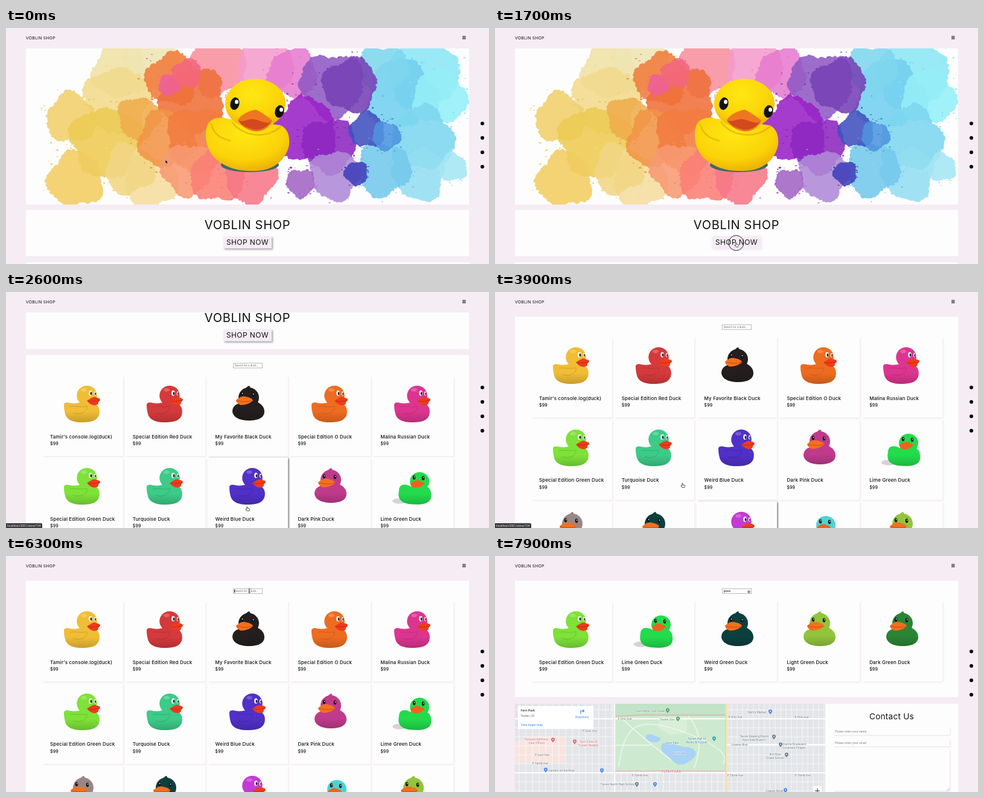
An HTML page that plays this animation: 800x393 px, repeating every 8000 ms.

```html
<!DOCTYPE html>
<html lang="en">
<head>
<meta charset="utf-8">
<title>Voblin Shop</title>
<style>
html, body { margin: 0; width: 100%; height: 100%; overflow: hidden; background: #f5ecf4; }
#stage { position: relative; width: 800px; height: 393px; overflow: hidden; color: #111; font-family: Inter, sans-serif; }
#stage div, svg { position: absolute; }
.t { line-height: 0; white-space: nowrap; }
.mid { left: 0; width: 800px; text-align: center; }
.panel { left: 33px; width: 734px; background: #fdfdfd; }
#page { left: 0; top: 0; width: 800px; }
#nav { left: 0; top: 0; width: 800px; height: 34px; background: #f5ecf4; }
#shop { left: 360px; top: 347px; width: 80px; height: 20px; background: #f5ebf4; box-shadow: 2px 2px 3px #aaa4aa; }
#shop.over { box-shadow: 1px 1px 4px 1px #f3e6f2; }
.card { width: 133.5px; height: 134px; background: #fdfdfd; box-shadow: 1.5px 1.5px 3px #f1e6ef; }
.card.over { box-shadow: 2px 1px 3px #8d878d; }
.card .t { left: 13px; font-size: 8px; font-weight: 500; letter-spacing: .15px; }
#box { left: 376px; top: 13px; width: 47px; height: 7px; border: .5px solid #bbb; background: #fff;
  font-family: "Liberation Sans", Arial, sans-serif; font-size: 4.6px; }
#status { left: 0; top: 385px; width: 60px; height: 8px; background: #3b3a3c; color: #ddd; border-radius: 0 2px 0 0;
  font: 4.9px Roboto, sans-serif; }
.field { left: 561px; width: 192px; background: #fdfdfd; box-shadow: 1px 1px 2px #eadfe8; color: #777; font-size: 4.7px; }
</style>
</head>
<body>
<div id="stage">
  <div id="page">
    <svg id="hero" style="left:33px;top:34px" width="734" height="260" viewBox="33 34 734 260"></svg>
    <div class="panel" style="top:303px;height:77px"></div>
    <div class="t mid" style="top:328px;font-size:20px;letter-spacing:.7px">VOBLIN SHOP</div>
    <div id="shop"></div>
    <div class="t mid" style="top:357px;font-size:12px;letter-spacing:.4px">SHOP NOW</div>
    <div id="store" style="top:390px;left:0">
      <div class="panel" id="shelf" style="top:0"></div>
      <div id="box"><div class="t" id="query" style="left:1.5px;top:3.7px"></div>
        <div id="caret" style="left:1.2px;top:1px;width:.6px;height:5px;background:#000"></div>
        <svg id="clear" style="left:41px;top:1.5px" width="5" height="5" viewBox="0 0 5 5"><circle cx="2.5" cy="2.5" r="2.2" fill="#777"/><path d="M1.6 1.6l1.8 1.8m0-1.8l-1.8 1.8" stroke="#fff" stroke-width=".6"/></svg>
      </div>
      <div id="cards"></div>
      <div id="visit" style="left:0">
        <div class="panel" style="top:0;height:200px"></div>
        <svg id="map" style="left:33px;top:0" width="514" height="200" viewBox="33 246 514 200"></svg>
        <div class="t" style="left:547px;width:220px;top:21px;text-align:center;font-size:13.6px;letter-spacing:.25px">Contact Us</div>
        <div class="field" style="top:40px;height:12px"><div class="t" style="left:2px;top:6px">Please enter your name</div></div>
        <div class="field" style="top:59px;height:12px"><div class="t" style="left:2px;top:6px">Please enter your email</div></div>
        <div class="field" style="top:77px;height:68px"><svg style="right:0;bottom:0" width="5" height="5"><path d="M0 5L5 0M3 5L5 3" stroke="#888" stroke-width=".6"/></svg></div>
      </div>
    </div>
  </div>
  <div id="nav">
    <div class="t" style="left:33px;top:16.5px;font-size:6.8px;letter-spacing:.28px">VOBLIN SHOP</div>
    <svg style="left:756px;top:13px" width="6" height="6"><path d="M0 1h5.5M0 3h5.5M0 5h5.5" stroke="#111"/></svg>
  </div>
  <svg style="left:784px;top:150px" width="10" height="90"><g><circle cx="5" cy="9" r="3"/><circle cx="5" cy="33" r="3"/><circle cx="5" cy="57" r="3"/><circle cx="5" cy="81" r="3"/></g></svg>
  <div id="status"><div class="t" style="left:2px;top:4px">localhost:3001/store/104</div></div>
  <svg width="800" height="393" style="left:0;top:0">
    <circle id="ring" cx="399.5" cy="358" r="12.5" fill="none" stroke="#222"/>
    <g id="cursor" stroke-linejoin="round">
      <path id="arrow" d="M0 0V6L1.4 4.8 2.5 7.2 3.6 6.7 2.6 4.4H4.5Z" stroke="#fff" stroke-width=".4"/>
      <path id="hand" d="M-.7 0Q0-.8.7 0V2.2L3.6 2.9Q4.3 3.2 4.1 4.4L3.2 6.6H-.6L-2.6 3.8Q-2.2 2.8-.7 4Z" fill="#fff" stroke="#111" stroke-width=".7"/>
      <path id="beam" d="M-1.6-3.2Q0-3.2 0-2.2Q0-3.2 1.6-3.2M0-2.2V2.2M-1.6 3.2Q0 3.2 0 2.2Q0 3.2 1.6 3.2" fill="none" stroke="#111" stroke-width=".8"/>
    </g>
  </svg>
</div>
<script>
const $ = id => document.getElementById(id);
let seed = 7;
const rand = () => (seed = seed * 16807 % 2147483647) / 2147483647;
const ell = (x, y, rx, ry, fill) => `<ellipse cx="${x}" cy="${y}" rx="${rx}" ry="${ry}" fill="${fill}"/>`;
const shape = (d, fill, more = '') => `<path d="${d}" fill="${fill}" ${more}/>`;

// Hero painting
const paint = [
  [190, 70, 48, '#f0e2a6'], [245, 60, 46, '#eee5b4'], [185, 120, 56, '#f2da8c'], [240, 255, 46, '#f5dda0'],
  [108, 150, 42, '#f1d06c'], [165, 190, 60, '#edcb52'], [115, 252, 47, '#f2cd61'], [205, 235, 42, '#f3d684'],
  [220, 150, 36, '#f0ae4c'], [350, 65, 48, '#f990a0'], [275, 85, 44, '#f17d3c'], [310, 120, 54, '#f07038'],
  [265, 185, 48, '#f29446'], [320, 185, 56, '#f37c40'], [300, 235, 44, '#f89a72'], [350, 245, 46, '#fb8076'],
  [405, 248, 44, '#f77888'], [430, 70, 48, '#f49ccb'], [475, 75, 42, '#e87bd0'], [270, 95, 18, '#f0609a'],
  [300, 75, 24, '#f4667f'], [690, 75, 60, '#8be6f6'], [655, 110, 58, '#72d0f0'], [718, 115, 46, '#95f0f8'],
  [625, 70, 42, '#7fd6ee'], [690, 185, 54, '#7dd6ef'], [685, 245, 44, '#93def2'], [625, 235, 46, '#75c9ec'],
  [540, 95, 54, '#9059c4'], [570, 95, 46, '#7641b6'], [495, 170, 54, '#9a22c6'], [535, 195, 46, '#8d27c0'],
  [545, 245, 42, '#b089d8'], [488, 258, 24, '#a265c4'], [598, 170, 30, '#4050c0'], [630, 180, 24, '#4d94e0'],
  [580, 242, 20, '#4040ba'], [740, 232, 24, '#a6e6f5']];

function blob(x, y, r, color) {
  const p1 = rand() * 6.3, p2 = rand() * 6.3, n = 90;
  let d = '';
  for (let i = 0; i < n; i++) {
    const a = i / n * 6.283;
    const k = r * (.93 + .08 * Math.sin(3 * a + p1) + .06 * Math.sin(5 * a + p2) + .09 * rand());
    d += `${i ? 'L' : 'M'}${(x + k * Math.cos(a)).toFixed(1)} ${(y + k * Math.sin(a)).toFixed(1)}`;
  }
  let s = shape(d + 'Z', color, 'opacity=".88"');
  for (let i = 0; i < 14; i++) {
    const a = rand() * 6.283, k = r * (.95 + rand() * .32);
    s += ell(x + k * Math.cos(a), y + k * Math.sin(a), .4 + rand() * 2, .4 + rand(), color);
  }
  return s;
}
const bigEye = (x, y) => `<g transform="rotate(12 ${x} ${y})">` + ell(x, y, 7.5, 10.5, '#111') + '</g>' + ell(x + 3, y - 3, 3, 3.5, '#fff');
$('hero').innerHTML = `<defs>
  <radialGradient id="yellow" cx=".45" cy=".3" r=".8"><stop offset="0" stop-color="#ffe812"/><stop offset=".6" stop-color="#fbd308"/><stop offset="1" stop-color="#e5a305"/></radialGradient>
  <linearGradient id="shade" x2="0" y2="1"><stop offset=".45" stop-opacity="0"/><stop offset="1" stop-opacity=".17"/></linearGradient></defs>
  <rect x="33" y="34" width="734" height="260" fill="#fdfdfd"/>` + paint.map(b => blob(...b)).join('') +
  ell(404, 228, 48, 12, '#3d6a6a') +
  shape('M366 151C350 147 335 151 332 167C328 191 337 212 355 224C375 237 395 239 415 238C443 237 465 219 469 194C470 180 467 168 455 162Z', 'url(#yellow)') +
  ell(413, 126, 50, 41.5, 'url(#yellow)') +
  shape('M340 160C345 180 358 184 372 188M374 156C390 180 432 187 456 163', 'none', 'stroke="#dfa10a" stroke-width="2.5" opacity=".6"') +
  shape('M384 153C390 143 405 137 414 136C424 141 434 148 441 154C434 169 422 173 411 172C399 170 389 163 384 153Z', '#ef7620') +
  shape('M384 154C394 158 401 150 411 152C423 154 432 162 440 155C432 166 421 171 410 169C399 166 390 162 384 154Z', '#d2491b') +
  bigEye(379, 126) + bigEye(453, 139);

// Product pictures, in card coordinates
const eye = (x, y) => ell(x, y, 2.3, 3.4, '#16120f') + ell(x + .6, y - 1.1, .8, 1, '#fff');
const body = (d, c) => shape(d, c) + shape(d, 'url(#shade)');
const poses = {
  side: c => body('M36 48C38 44 42 45 47 46C54 47 58 46 63 45L88 47C95 52 96 59 94 66C91 74 84 78 66 78C48 78 40 72 38 64C36 57 36 52 36 48Z', c) +
    ell(74, 33.5, 16.8, 16.5, c) + shape('M46 52C54 50 65 54 74 51C76 61 61 67 51 62', 'none', 'stroke="#000" opacity=".14"') +
    ell(69, 24, 5, 3, '#ffffff38') +
    ell(80, 29.5, 2.8, 4.4, '#fff') + ell(81, 30, 1.5, 2.8, '#222') + ell(87.5, 30, 1.6, 3.6, '#fff') + ell(88, 30.5, .9, 2.3, '#222') +
    shape('M74 42C80 39 84 35 88 36C92 38 96 37 96 41C95 43 92 44 93 47C88 52 80 50 74 42Z', '#ee3b1d') +
    shape('M76 42.5C83 44 89 43 95 41', 'none', 'stroke="#b82412" stroke-width=".8"'),
  front: c => body('M54 46C44 48 41 54 41 60C42 70 54 75 68 75C84 75 94 70 94 60C94 52 88 47 82 44Z', c) +
    shape('M62 23C65 19 66 18 69 17C70 19 70 20 74 23Z', c) + ell(68, 37, 17, 17, c) + eye(57, 31) + eye(75, 32) +
    shape('M47 41C52 37 56 34 62 35C68 36 74 38 75 42C70 47 60 50 54 49C50 47 47 44 47 41Z', '#f3701e') +
    shape('M48 42C55 43 65 45 74 42', 'none', 'stroke="#bd4312" stroke-width=".8"'),
  tub: c => ell(45, 72, 12, 4.5, '#d5d3d5') +
    body('M64 48C54 42 44 44 44 54C42 64 43 74 60 77C78 79 95 78 97 66C98 56 95 50 90 48Z', c) +
    ell(78, 39.5, 16, 15.5, c) + eye(69, 33) + eye(84, 34) +
    shape('M63 43C68 38 74 36 79 39L86 42C84 47 78 50 72 50C66 50 63 47 63 43Z', '#f0621c')
};
const ducks = [
  ["Tamir's console.log(duck)", 'side', '#f0bd35'], ['Special Edition Red Duck', 'side', '#d43a3c'],
  ['My Favorite Black Duck', 'front', '#241f1e'], ['Special Edition O Duck', 'side', '#ee6c20'],
  ['Malina Russian Duck', 'side', '#dc3590'], ['Special Edition Green Duck', 'side', '#7ee238'],
  ['Turquoise Duck', 'side', '#3ccb88'], ['Weird Blue Duck', 'side', '#5030c8'],
  ['Dark Pink Duck', 'front', '#c03a8c'], ['Lime Green Duck', 'tub', '#22dc4c'],
  ['Mocha Duck', 'front', '#9a8785'], ['Weird Green Duck', 'front', '#0c403f'],
  ['Violet Duck', 'side', '#c43bd4'], ['Aqua Duck', 'tub', '#4cd3d2'],
  ['Light Green Duck', 'front', '#92c43c'], ['Dark Green Duck', 'front', '#2b8535']];
$('cards').innerHTML = ducks.map(([name, pose, color]) => `<div class="card">
  <svg width="133" height="90">${poses[pose](color)}</svg>
  <div class="t" style="top:101.5px">${name}</div><div class="t" style="top:114px;font-size:7px">$99</div></div>`).join('');
const cards = [...$('cards').children];

// Map
const line = (x1, y1, x2, y2, c = '#f8f8f9', w = 1) => `<path d="M${x1} ${y1}L${x2} ${y2}" stroke="${c}" stroke-width="${w}"/>`;
const label = (x, y, s, c = '#6b7580', size = 5) => s.split('|').map((l, i) =>
  `<text x="${x}" y="${y + 2 + i * 6}" fill="${c}" font-size="${size}" text-anchor="middle" stroke="#fff" stroke-width=".8" paint-order="stroke">${l}</text>`).join('');
const pin = (x, y, c) => shape(`M${x} ${y + 5}C${x - 1} ${y + 2} ${x - 3} ${y + 2} ${x - 3} ${y - .5}A3 3 0 0 1 ${x + 3} ${y - .5}C${x + 3} ${y + 2} ${x + 1} ${y + 2} ${x} ${y + 5}Z`, c) + ell(x, y - .5, 1, 1, '#fff');
function drawMap() {
  const green = '#4b8b62', teal = '#33808e', rose = '#c8686c', blue = '#5580c8';
  let s = `<rect x="33" y="246" width="514" height="200" fill="#e3e5e8"/>` +
    shape('M33 310L60 300H116V345H33Z', '#f8e4df');
  for (let x = 40; x < 196; x += 11) s += line(x, 246, x, 446);
  for (let x = 199; x < 382; x += 10) s += line(x, 358, x, 446);
  for (let x = 392; x < 547; x += 9) s += line(x, 246, x, 446, '#f5f6f7', .9);
  for (let y = 256; y < 446; y += 15) s += line(33, y, 547, y, '#f8f8f9', 1.2);
  s += shape('M197 246H382V357H197Z', '#cdead0') + shape('M197 246H382V266H197Z', '#c2e3c8') +
    shape('M272 268H318V294L290 298L270 285Z', '#d9efd7') +
    shape('M205 350Q212 290 240 282T330 300T378 346M210 270Q240 300 300 346M320 267Q350 300 330 353M200 315H260', 'none', 'stroke="#f3f8f2" stroke-width="1.3"') +
    shape('M278 312C292 308 300 318 318 318C332 320 338 330 327 338C318 346 308 350 301 346C294 344 292 337 284 332C276 326 272 318 278 312Z', '#a9d3f5') +
    shape('M251 298C259 294 263 300 273 302C276 308 267 312 260 310C254 308 247 304 251 298Z', '#a9d3f5') +
    shape('M198 358V267L240 265H382V358Z', 'none', 'stroke="#e98c88" stroke-width=".8"') +
    line(33, 271, 547, 271, '#fff', 2) + line(383, 314, 547, 314, '#fff', 2) + line(33, 361, 547, 361, '#fff', 2.2) +
    line(198, 246, 198, 446, '#fff', 2) + line(383, 246, 383, 446, '#f7e3a5', 2.6);
  s += label(258, 258, 'Fern Moor Golf Green', green) + label(285, 272, 'Tavren Zoo', green) +
    label(334, 304, 'Tavren Hall of|Rocks &amp; Fossils', teal) + label(294, 311, 'Fern Park', green) +
    label(305, 328, 'Orvil Lake', blue) + label(292, 359, 'FERN PARK', rose, 6.4) +
    label(434, 260, "Nolli's Market") + label(429, 300, 'Tavren Reading Room|East Side Branch') +
    label(495, 313, 'Ulverne Boulevard|Covenant Chapel') + label(464, 330, 'Elm Rise|Grade School') +
    label(203, 380, 'Tavren North High School') + label(110, 357, 'Lantern on the Rise') +
    label(463, 391, 'Copper Nook') + label(69, 305, 'Solvane Wellness|Care Offices', rose) +
    label(155, 309, 'Ovin Clinic of|Tavren Heights', rose) +
    [[215, 271], [398, 268], [508, 268]].map(p => label(...p, 'E Orlo Ave')).join('') +
    [[75, 345], [240, 365], [398, 365], [510, 365]].map(p => label(...p, 'E Tamb Ave')).join('') +
    [[78, 331], [157, 291]].map(p => label(...p, 'E Quin Ave')).join('') + label(405, 314, 'Ulverne Blvd');
  s += pin(286, 257, '#4aa568') + pin(303, 271, '#4aa568') + pin(363, 304, '#31a2a4') + pin(456, 259, '#4a86e8') +
    pin(462, 301, '#6d7e92') + pin(473, 314, '#6d7e92') + pin(483, 331, '#6d7e92') + pin(235, 380, '#6d7e92') +
    pin(265, 380, '#4a86e8') + pin(84, 356, '#4a86e8') + pin(177, 357, '#4a86e8') + pin(481, 390, '#4a86e8') +
    pin(96, 306, '#e2666a') + pin(132, 309, '#e2666a');
  s += '<rect x="38" y="250" width="125" height="38" fill="#fff"/>' +
    '<rect x="527" y="383" width="14" height="28" fill="#fff"/>' + line(530, 391, 538, 391, '#666', 1.4) + line(534, 387, 534, 395, '#666', 1.4) +
    shape('M142 263V258H147M145 256L147.5 258L145 260', 'none', 'stroke="#4285f4" stroke-width="1.2"');
  const note = (y, txt, c, size, x = 42.5) => `<text x="${x}" y="${y}" fill="${c}" font-size="${size}">${txt}</text>`;
  return s + note(259, 'Fern Park', '#111', 5.6) + note(267.5, 'Tavren, CO', '#666', 4.8) +
    note(282.5, 'View larger map', '#4285f4', 5.1) + note(269.5, 'Directions', '#4285f4', 5, 133);
}
$('map').style.fontFamily = 'Roboto, sans-serif';
$('map').innerHTML = drawMap();

// Motion
const LOOP = 8000, pitch = 136.8;
const ease = p => p < .5 ? 2 * p * p : 1 - 2 * (1 - p) ** 2;
const part = (t, a, b) => ease(Math.min(1, Math.max(0, (t - a) / (b - a))));
const scrollAt = t => 349 * part(t, 2050, 2840);
const stops = [[100, 264, 219.5], [900, 410, 356], [1050, 410, 356], [1500, 399.5, 358],
  [3800, 399.5, 358], [3900, 310.5, 319], [4700, 310.5, 319], [5800, 403, 58]];
function pointer(t) {
  let [, x, y] = stops[0];
  for (let i = 1; i < stops.length; i++) {
    const [t0, x0, y0] = stops[i - 1], [t1, x1, y1] = stops[i], p = part(t, t0, t1);
    x += (x1 - x0) * p;
    y += (y1 - y0) * p;
  }
  return [x, y];
}
const show = (id, on) => $(id).style.display = on ? '' : 'none';

function render(t) {
  const [x, y] = pointer(t), typing = t >= 6600;
  $('page').style.top = -scrollAt(t) + 'px';
  $('cursor').setAttribute('transform', `translate(${x} ${y})`);
  const kind = t < 1000 || y >= 64 && y < 75 ? 'arrow' : y < 64 ? 'beam' : 'hand';
  for (const k of ['arrow', 'hand', 'beam']) show(k, k === kind && !typing);
  show('ring', t >= 1600 && t < 1900);
  $('shop').className = t >= 1000 && t < 2200 ? 'over' : '';
  show('status', t >= 2400 && t < 5400);

  const typed = 'green'.slice(0, [6700, 6950, 7150, 7350, 7550].filter(k => t >= k).length);
  $('query').textContent = typed || 'Search for a duck..';
  $('query').style.color = typed ? '#111' : '#777';
  show('clear', typed);
  show('caret', t >= 6000 && !typed);

  // Hover follows the pointer one step late
  const [hx, hy] = pointer(t - 100), top = 390 - scrollAt(t - 100);
  let n = 0;
  cards.forEach((card, i) => {
    const hit = ducks[i][0].toLowerCase().includes(typed);
    card.style.display = hit ? '' : 'none';
    if (!hit) return;
    const cx = 60 + n % 5 * pitch, cy = 34 + Math.floor(n / 5) * pitch;
    card.style.left = cx + 'px';
    card.style.top = cy + 'px';
    const over = t > 2100 && hx > cx && hx < cx + 134 && hy > top + cy && hy < top + cy + 134;
    card.className = over ? 'card over' : 'card';
    n++;
  });
  const height = 57.5 + Math.ceil(n / 5) * pitch;
  $('shelf').style.height = height + 'px';
  $('visit').style.top = height + 10.5 + 'px';
}
function tick() {
  render(Math.floor(performance.now() % LOOP / 100) * 100);
  requestAnimationFrame(tick);
}
tick();
</script>
</body>
</html>
```
